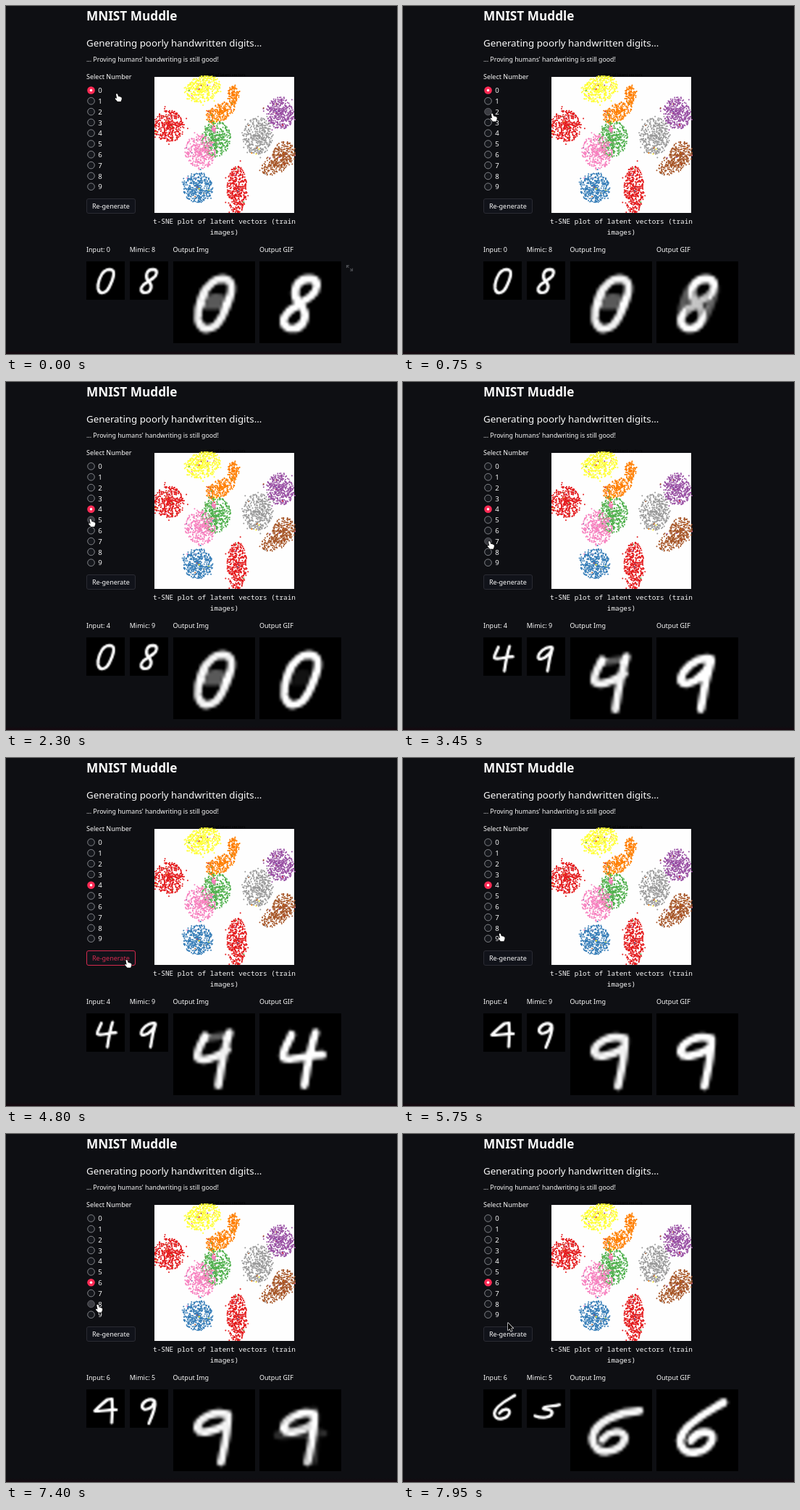
These frames come from a looping animation (540x481 px, 8 s). An HTML page with a canvas:

```html
<!DOCTYPE html>
<html lang="en">
<head>
<meta charset="utf-8">
<title>MNIST Muddle</title>
<style>
  html, body { margin: 0; width: 100%; height: 100%; overflow: hidden; background: #0e0f13; }
  canvas { display: block; width: 540px; height: 481px; }
</style>
</head>
<body>
<canvas id="stage" width="540" height="481"></canvas>
<script>
const LOOP = 8000;
const RED = '#ff2b55', INK = '#fafafa', BACK = '#0e0f13';
const SANS = '"Noto Sans", "Open Sans", sans-serif';
const MONO = '"Noto Sans Mono", "DejaVu Sans Mono", monospace';
const ctx = document.getElementById('stage').getContext('2d');

const clamp = v => Math.max(0, Math.min(1, v));
const ease = p => p * p * (3 - 2 * p);
const rowY = i => 116.5 + i * 14.8;

function makeCanvas(w, h) {
  const c = document.createElement('canvas');
  c.width = w;
  c.height = h;
  return c.getContext('2d');
}

function text(g, str, x, y, size = 9, color = INK, family = SANS, weight = 500, align = 'left') {
  g.font = `${weight} ${size}px ${family}`;
  g.fillStyle = color;
  g.textAlign = align;
  g.fillText(str, x, y);
}

// ---- Static page: headings, scatter plot, captions ----

// colour, centre x, centre y, radius x, radius y, rotation, count
const clusters = [
  ['#ffff33', 271, 115, 26, 18, -0.4, 400],
  ['#ff7f00', 314, 123, 8, 14, 0.1, 130],
  ['#ff7f00', 296, 147, 22, 12, -0.5, 260],
  ['#e41a1c', 225, 166, 21, 22, 0.2, 400],
  ['#984ea3', 379, 148, 19, 22, -0.2, 380],
  ['#4daf4a', 290, 184, 20, 25, 0.2, 400],
  ['#f781bf', 268, 201, 21, 24, -0.2, 380],
  ['#f781bf', 287, 171, 3, 4, 0, 25],
  ['#999999', 348, 180, 21, 26, 0.1, 400],
  ['#a65628', 384, 204, 16, 17, 0.2, 180],
  ['#a65628', 373, 218, 22, 14, -0.5, 210],
  ['#377eb8', 265, 251, 21, 21, -0.5, 390],
  ['#e41a1c', 319, 254, 14, 33, 0, 410]
];

function drawScatter(g) {
  let seed = 7;
  const rand = () => (seed = seed * 16807 % 2147483647) / 2147483647;
  const dot = (x, y, color) => {
    g.fillStyle = color;
    g.beginPath();
    g.arc(x, y, 1, 0, 7);
    g.fill();
  };
  g.fillStyle = '#fefefe';
  g.fillRect(205, 98, 193, 188);
  for (const [color, cx, cy, rx, ry, turn, count] of clusters) {
    for (let i = 0; i < count; i++) {
      const stray = rand() < 0.05 ? 1.25 : 1;
      const r = rand() ** 0.66 * stray, a = rand() * Math.PI * 2;
      const x = Math.cos(a) * rx * r, y = Math.sin(a) * ry * r;
      const other = clusters[Math.floor(rand() * clusters.length)][0];
      dot(Math.max(206, Math.min(399, cx + x * Math.cos(turn) - y * Math.sin(turn))),
          Math.max(97, Math.min(285, cy + x * Math.sin(turn) + y * Math.cos(turn))),
          rand() < 0.025 ? other : color);
    }
  }
}

function drawPage() {
  const g = makeCanvas(540, 481);
  g.fillStyle = BACK;
  g.fillRect(0, 0, 540, 481);
  const edge = g.createLinearGradient(0, 476, 0, 481);
  edge.addColorStop(0, BACK);
  edge.addColorStop(1, '#16080f');
  g.fillStyle = edge;
  g.fillRect(0, 476, 540, 5);
  text(g, 'MNIST Muddle', 111, 20.3, 17.2, INK, SANS, 700);
  text(g, 'Generating poorly handwritten digits...', 111, 56, 13.3);
  text(g, "... Proving humans' handwriting is still good!", 111, 76.5, 8.8);
  text(g, 'Select Number', 111, 101);
  for (let i = 0; i < 10; i++) text(g, i, 127.3, rowY(i) + 3.6, 9.6);
  text(g, 't-SNE of latent vectors', 302, 97, 5.5, '#000', SANS, 400, 'center');
  drawScatter(g);
  text(g, 't-SNE plot of latent vectors (train', 301.5, 300.5, 9.4, INK, MONO, 500, 'center');
  text(g, 'images)', 301.5, 315.5, 9.4, INK, MONO, 500, 'center');
  text(g, 'Output Img', 230.5, 340);
  text(g, 'Output GIF', 350, 340);
  return g.canvas;
}

// ---- Digits, drawn on a 28 x 28 grid and scaled up ----

const zero = 'M17 5.8C22 6 20 12 17 18.5C14.5 24 9.5 24.5 8.6 20C8 16 10.5 9 13.3 7.3Q15 5.8 17 5.8Z';
const eight = 'M17 5.8C21 6 20 10 17.5 12L10 17.2C7 20 8 23 11.5 23C15 23 17 18.5 14.5 15.5C10.5 12 12 5.8 17 5.8Z';
const four = 'M11 7.2C10 10 7.4 13.8 8.2 15.2C10 16.8 14 14.6 21.6 14.2M19.2 6.6C18 10 16.8 15.5 15.4 24.6';
const nine = 'M18.6 7.2C13.5 6 8 12 8.4 15C9.5 17.5 16.5 14.5 18.8 8L16.8 15.5L15.2 24.6';
const openNine = 'M11 7.6C9.8 10 7.6 13.6 8.4 15.2C10.5 17 15.5 14.5 18.6 12.4M19.3 6.6C18.2 10 16.8 16 15.5 24.7';
const caretFour = 'M18.8 7L15.5 7.5C12 10 9 13 6.2 15.8C11 16.8 16 14.5 22 15M18.8 7Q19.5 15 18.6 24.5';
const curlNine = 'M18.2 8.6C14.5 5.5 8.8 9.5 9 13C10 16.5 17 14.5 18.2 8.6C19.5 14 16.5 18 14 25';
const flatNine = 'M18.8 8.6C14 7 8 10 8.3 13.4C9 16 15 14 18.4 12M18.8 8.6C19 14 17.5 20 16.4 25';
const six = 'M23 4.5C18 7.5 8.5 12 8.1 17.5C8 24 18 22 19.2 17C19.5 13.5 14 14 11.8 17.5';
const lowSix = 'M23.8 7.3C17 7.5 8 11 7.6 16.8C7.6 23.5 18 22 18.8 16.8C18.8 13.5 13.5 13.8 11 17.2';
const five = 'M24 11.3C20 13 15 11.5 12.5 13.4C10.5 15.5 18.5 13.5 18.6 17C18 21 11 21.5 6 19.5';

const sets = [
  { from: 0, ends: [zero, eight], blend: zero, faint: 'M12 12.8Q15 12 18 13M11 15.2L17 15.2' },
  { from: 2550, ends: [four, nine], blend: openNine, faint: 'M11.5 8.5L18.5 7.5' },
  { from: 5450, ends: [caretFour, curlNine], blend: flatNine, faint: '' },
  { from: 7600, ends: [six, five], blend: lowSix, faint: '' }
];

const grid = makeCanvas(28, 28);
grid.lineCap = grid.lineJoin = 'round';
grid.strokeStyle = '#fff';
ctx.imageSmoothingQuality = 'high';

// layers: [path, strength] pairs, added together
function digit(x, size, width, layers) {
  grid.globalCompositeOperation = 'source-over';
  grid.globalAlpha = 1;
  grid.filter = 'none';
  grid.fillRect(0, 0, 28, 28);
  grid.globalCompositeOperation = 'lighter';
  grid.filter = 'blur(0.7px)';
  grid.lineWidth = width;
  for (const [path, strength] of layers) {
    if (!path || strength <= 0) continue;
    grid.globalAlpha = strength;
    grid.stroke(new Path2D(path));
  }
  ctx.drawImage(grid.canvas, x, 353, size, size);
}

function drawDigits(t) {
  const { ends: [input, mimic], blend, faint } = sets.findLast(s => t >= s.from);
  const mix = clamp(0.5 + 0.85 * Math.cos((t - 150) / 3200 * Math.PI * 2));
  const middle = 1 - Math.abs(2 * mix - 1);
  digit(111, 52.7, 2.2, [[input, 1]]);
  digit(171, 52.7, 2.2, [[mimic, 1]]);
  digit(230.7, 113, 2.7, [[blend, 0.95], [faint, 0.35]]);
  digit(350, 113, 2.7, [
    [input, 1 - 2 * mix], [mimic, 2 * mix - 1], [blend, middle], [faint, middle * 0.35]
  ]);
}

// ---- Pointer and controls ----

// time, x, y of the pointer tip
const track = [
  [0, 153, 121], [200, 153, 121], [900, 119, 152], [1400, 116.5, 172], [1950, 116.5, 172],
  [2300, 116.5, 189], [2800, 117, 197], [3400, 119, 219.5], [3700, 120, 223], [4450, 160, 274],
  [4750, 166.5, 278.8], [5150, 166.5, 278.8], [5900, 130, 238], [6500, 119, 208.5], [6950, 119, 208.5],
  [7500, 127, 238], [7950, 145, 261], [8000, 145, 261]
];
const clicks = [1700, 4850, 6530];

function pointerAt(t) {
  const i = Math.max(1, track.findIndex(k => k[0] > t));
  const [t0, x0, y0] = track[i - 1], [t1, x1, y1] = track[i];
  const p = ease((t - t0) / (t1 - t0));
  return [x0 + (x1 - x0) * p, y0 + (y1 - y0) * p];
}

const arrow = new Path2D('M0 0V10.2L2.4 8L4 11.8L5.7 11L4.1 7.4H7.3Z');
const hand = new Path2D('M-1 1Q0 -.6 1.1 1L2.2 4.2Q3.2 3.5 4 4.6Q5 4 5.6 5.2Q6.7 5 6.8 6.4L6.6 8.6Q6 9.6 5.6 11H1Q0 9.4 -2.2 7.4Q-2.4 5.9 -.8 6.4L.2 7Z');

function drawPointer(x, y) {
  const isArrow = y > 255 && y < 266;
  const shape = isArrow ? arrow : hand;
  ctx.save();
  ctx.translate(x, y);
  ctx.lineWidth = 1.3;
  ctx.lineJoin = 'round';
  ctx.strokeStyle = isArrow ? '#fff' : '#111';
  ctx.stroke(shape);
  ctx.fillStyle = isArrow ? '#000' : '#fff';
  ctx.fill(shape);
  ctx.restore();
}

function circle(x, y, r) {
  ctx.beginPath();
  ctx.arc(x, y, r, 0, Math.PI * 2);
}

function drawRing(t, x, y) {
  for (const start of clicks) {
    const p = (t - start) / 340;
    if (p < 0 || p > 1) continue;
    circle(x + 1, y + 1.5, 15 + 9 * Math.sqrt(p) * (0.8 + 0.2 * p));
    ctx.lineWidth = 1.4;
    ctx.strokeStyle = `rgba(210,210,215,${1 - p * 0.9})`;
    ctx.stroke();
  }
}

function drawRadios(selected, x, y) {
  for (let i = 0; i < 10; i++) {
    const cy = rowY(i), hover = x < 140 && Math.abs(y - cy) < 7;
    const on = i === selected;
    circle(117.5, cy, on ? 5.3 : 4.8);
    ctx.fillStyle = on ? RED : hover ? '#3b3c42' : '#15171c';
    ctx.fill();
    if (on) {
      circle(117.5, cy, 1.7);
      ctx.fillStyle = '#fff';
      ctx.fill();
    } else {
      ctx.lineWidth = 1;
      ctx.strokeStyle = hover ? '#5c5d63' : '#85878c';
      ctx.stroke();
    }
  }
}

function drawButton(x, y) {
  const hover = x > 111 && x < 179 && y > 266 && y < 288;
  ctx.beginPath();
  ctx.roundRect(111.5, 266.5, 67, 20, 2.5);
  ctx.fillStyle = '#11131a';
  ctx.fill();
  ctx.lineWidth = 1;
  ctx.strokeStyle = hover ? '#d42a4e' : '#2a2b33';
  ctx.stroke();
  text(ctx, 'Re-generate', 119, 280.2, 9, hover ? '#d92c50' : INK);
}

function drawExpandIcon() {
  ctx.strokeStyle = '#4a4c51';
  ctx.lineWidth = 1.2;
  ctx.stroke(new Path2D('M470.5 362V358.5H474M470.5 358.5L473.5 361.5M478.5 362.5V366H475M478.5 366L475.5 363'));
}

const page = drawPage();

function render(t) {
  const [x, y] = pointerAt(t);
  const selected = t < 1950 ? 0 : t < 6900 ? 4 : 6;
  const [input, mimic] = t < 2150 ? [0, 8] : t < 7100 ? [4, 9] : [6, 5];
  ctx.drawImage(page, 0, 0);
  drawRadios(selected, x, y);
  drawButton(x, y);
  text(ctx, `Input: ${input}`, 111, 340);
  text(ctx, `Mimic: ${mimic}`, 170.7, 340);
  drawDigits(t);
  if (t < 150) drawExpandIcon();
  drawRing(t, x, y);
  drawPointer(x, y);
}

function tick() {
  render(performance.now() % LOOP);
  requestAnimationFrame(tick);
}
tick();
</script>
</body>
</html>
```
